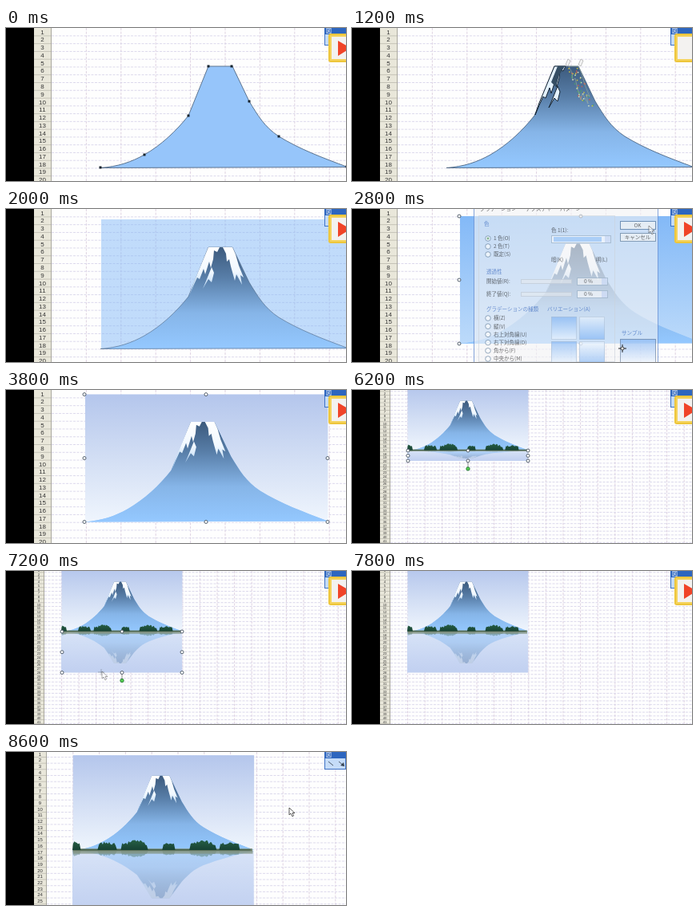
Recreate the animation shown at these times as an HTML page with a canvas. Size 425 by 192 pixels, loop 9.2 s.

```html
<!DOCTYPE html>
<html lang="ja">
<head>
<meta charset="utf-8">
<style>
html, body { margin: 0; width: 100%; height: 100%; overflow: hidden; background: #fff; }
canvas { display: block; width: 425px; height: 192px; }
</style>
</head>
<body>
<canvas id="stage" width="425" height="192"></canvas>
<script>
const c = document.getElementById('stage').getContext('2d');
const LOOP = 9200, STEP = 200;
const JP = '"Noto Sans CJK JP", "Noto Sans CJK", sans-serif';
const SANS = '"Liberation Sans", sans-serif';
const ramp = (t, a, b) => Math.max(0, Math.min(1, (t - a) / (b - a)));

function rng(seed) {
  return () => (seed = (seed * 16807) % 2147483647) / 2147483647;
}
function box(x, y, w, h, fill, stroke) {
  if (fill) { c.fillStyle = fill; c.fillRect(x, y, w, h); }
  if (stroke) { c.strokeStyle = stroke; c.lineWidth = 1; c.strokeRect(x + .5, y + .5, w - 1, h - 1); }
}
function line(x1, y1, x2, y2, color, width = 1) {
  c.strokeStyle = color; c.lineWidth = width;
  c.beginPath(); c.moveTo(x1, y1); c.lineTo(x2, y2); c.stroke();
}
function poly(p, fill, stroke, width = 1) {
  c.beginPath();
  for (let i = 0; i < p.length; i += 2) c.lineTo(p[i], p[i + 1]);
  c.closePath();
  if (fill) { c.fillStyle = fill; c.fill(); }
  if (stroke) { c.strokeStyle = stroke; c.lineWidth = width; c.stroke(); }
}
function text(s, x, y, size = 6.5, color = '#111', align = 'left', face = JP) {
  c.font = size + 'px ' + face; c.fillStyle = color;
  c.textAlign = align; c.textBaseline = 'middle';
  c.fillText(s, x, y);
}
function dot(x, y, r, fill, stroke) {
  c.beginPath(); c.arc(x, y, r, 0, 7);
  c.fillStyle = fill; c.fill();
  if (stroke) { c.strokeStyle = stroke; c.lineWidth = .9; c.stroke(); }
}
function fade(alpha, draw) {
  if (alpha <= 0) return;
  c.save(); c.globalAlpha *= alpha; draw(); c.restore();
}
function gradient(y1, y2, ...stops) {
  const g = c.createLinearGradient(0, y1, 0, y2);
  for (let i = 0; i < stops.length; i += 2) g.addColorStop(stops[i], stops[i + 1]);
  return g;
}
function cursor(x, y) {
  poly([x, y, x, y + 9, x + 2, y + 7, x + 4, y + 11, x + 5.5, y + 10, x + 4, y + 6.5, x + 7, y + 6.5], '#fff', '#333', .8);
}

// Worksheet per zoom level: header edge, row, column, font size, first row
const SHEETS = { 1: [57, 9.77, 43.4, 8, 5], .75: [51, 7.68, 32.8, 6, 2.6], .5: [48, 4.74, 21.6, 4.2, -.6] };
function sheet(zoom) {
  const [edge, row, col, size, first] = SHEETS[zoom];
  box(0, 0, 425, 192, '#fefefe');
  c.setLineDash([3, 1.5]);
  for (let x = edge + col; x < 425; x += col) line(x, 0, x, 192, '#dccfdf', .9);
  for (let n = 1; n < 43; n++) {
    const y = first + (n - .5) * row;
    line(edge, y, 425, y, '#d9d5ea', .9);
  }
  c.setLineDash([]);
  box(35, 0, edge - 35, 192, '#e9e7da');
  for (let n = 1; n < 43; n++) {
    const y = first + (n - 1) * row;
    line(35, y + row / 2, edge, y + row / 2, '#b5b3a8', .7);
    text(n, (34 + edge) / 2, y + .4, size, '#333', 'center', SANS);
  }
  line(edge - .5, 0, edge - .5, 192, '#aaa89e');
  box(0, 0, 35, 192, '#000');
}

function hill() {
  c.beginPath();
  c.moveTo(118, 175.5);
  c.bezierCurveTo(140, 174, 157, 168, 173, 159);
  c.bezierCurveTo(194, 147, 213, 129, 228, 110);
  c.lineTo(253, 48); c.lineTo(283, 48); c.lineTo(304, 92);
  c.bezierCurveTo(315, 110, 323, 124, 341, 136);
  c.bezierCurveTo(367, 152, 396, 163, 427, 174.5);
  c.closePath();
}
const NODES = [118, 175, 173, 159, 228, 110, 253, 48, 282, 48, 304, 92, 341, 136, 426, 174];
const SNOW_L = [253, 48, 267, 48, 264, 54, 260, 52, 259, 63, 256, 74, 254, 66, 249, 82, 247, 75, 242, 88, 239, 86, 234, 97, 229, 109, 234, 94];
const SNOW_R = [271, 48, 283, 48, 287, 57, 291, 71, 297, 86, 293, 83, 295, 95, 288, 82, 286, 90, 281, 72, 279, 63, 276, 66, 275, 56];
const SNOW_M = [246, 100, 251, 88, 257, 73, 260, 80, 257, 92, 253, 88];
const SNOWS = [SNOW_L, SNOW_R, SNOW_M];

function mountain(shade, outline) {
  hill(); c.fillStyle = '#96c5fa'; c.fill();
  fade(shade, () => {
    hill();
    c.fillStyle = gradient(48, 175, 0, '#3c5a7d', .3, '#587ea8', .65, '#86b5e8', 1, '#94c8ff');
    c.fill();
  });
  fade(outline, () => { hill(); c.strokeStyle = '#526984'; c.lineWidth = .9; c.stroke(); });
}

// Snow contour traced point by point
function trace(p, amount) {
  const n = Math.ceil(p.length / 2 * amount) * 2;
  if (n < 4) return;
  if (amount >= 1) return poly(p, '#e4f2ff', '#152432', 1);
  c.beginPath();
  for (let i = 0; i < n; i += 2) c.lineTo(p[i], p[i + 1]);
  c.strokeStyle = '#152432'; c.lineWidth = 1; c.stroke();
}
function editMarks() {
  const r = rng(37), hues = ['#d4c63d', '#4f9f67', '#c65d50', '#d8e4c0'];
  for (let i = 0; i < 46; i++) {
    const v = r(), x = 267 + r() * 16 + v * 19, y = 50 + v * 48;
    box(x, y, 1.5, 1.5, hues[i % 4]);
  }
  poly(SNOW_R, null, '#a9b99a', .5);
  for (const x of [267, 283]) poly([x, 46, x + 3, 39, x + 6, 41, x + 3, 48], '#f4f4f4', '#999', .6);
}

const TREES = (() => {
  const r = rng(91), p = [118, 175];
  for (let x = 119; x < 421; x += 2.2) {
    const bush = Math.sin(x * .115 + .6) + .8 * Math.sin(x * .047 + 4);
    p.push(x, bush > -.35 ? 167 - bush * 3 - r() * 5 : 174);
  }
  p.push(422, 175);
  return p;
})();

function trees(amount, shore) {
  c.save();
  c.beginPath(); c.rect(116, 140, 312 * amount, 38); c.clip();
  box(119, shore ? 172.5 : 169, 305, shore ? 4 : 7.5, shore || '#17392f');
  poly(TREES, gradient(156, 176, 0, '#286246', 1, '#163f33'));
  c.restore();
}

function scene(s) {
  fade(s.plain, () => box(119, 13, 308, 162.5, gradient(13, 175, 0, '#83b9f7', 1, s.tint)));
  fade(s.sky, () => box(119, 13, 308, 162.5, gradient(13, 175, 0, '#b4c6ec', .5, '#d2def4', 1, '#eff5fd')));
  mountain(s.shade, s.outline);
  if (s.trace > 0) {
    trace(SNOW_L, s.trace); trace(SNOW_M, s.trace);
    if (s.trace >= 1) poly([257, 48, 266, 48, 259, 59, 255, 74, 249, 68], '#344d63');
  }
  if (s.marks) editMarks();
  fade(s.snow, () => {
    const white = gradient(48, 110, 0, '#fff', .5, '#f1f8ff', 1, '#9fc9f0');
    SNOWS.forEach(p => poly(p, white));
  });
  if (s.trees > 0) trees(s.trees, s.shore);
}
function place(x, y, sx, sy, s) {
  c.save();
  c.translate(x, y); c.scale(sx, sy); c.translate(-118, -175.5);
  scene(s);
  c.restore();
}

function handles(x1, y1, x2, y2, knob) {
  const mx = (x1 + x2) / 2, my = (y1 + y2) / 2;
  if (knob) {
    line(mx, knob < my ? y1 : y2, mx, knob, '#777', .8);
    dot(mx, knob, 2.2, '#55cf50', '#267536');
  }
  for (const x of [x1, mx, x2]) for (const y of [y1, my, y2])
    if (x !== mx || y !== my) dot(x, y, 2, '#fff', '#43515e');
}

function dialog() {
  const title = (s, x, y) => text(s, x, y, 6.5, '#1d52b4');
  const radio = (s, y, on) => {
    dot(170, y, 3.3, '#fff', '#46698c');
    if (on) dot(170, y, 1.4, '#3c8a48');
    text(s, 177, y);
  };
  const field = (s, x, y, w) => {
    box(x, y - 5, w, 10, '#fff', '#7f9db9');
    text(s, x + 9, y);
    box(x + w - 8, y - 4, 7, 8, '#bed0f4');
  };
  box(152, -2, 231, 196, '#f3f4f6', '#3c70c8');
  box(158, 8, 171, 184, null, '#cbd2db');
  text('グラデーション', 160, 0); text('テクスチャ', 217, 0); text('パターン', 260, 0);
  title('色', 165, 19);
  radio('1 色(O)', 37, true); radio('2 色(T)', 47); radio('既定(S)', 57);
  text('色 1(1):', 249, 27);
  field('', 249, 38, 75); box(252, 35, 60, 6, '#83b7f5');
  text('暗(K)', 249, 64); text('明(L)', 305, 64);
  title('透過性', 168, 79);
  text('開始値(R):', 168, 91); text('終了値(Q):', 168, 107);
  for (const y of [91, 107]) {
    box(211, y - 3, 64, 6, '#e4e9ef', '#b8c4d2');
    field('0 %', 281, y, 39);
  }
  title('グラデーションの種類', 168, 126); title('バリエーション(A)', 244, 126);
  ['横(Z)', '縦(V)', '右上対角線(U)', '右下対角線(D)', '角から(F)', '中央から(M)']
    .forEach((s, i) => radio(s, 137 + i * 10.2));
  for (let i = 0; i < 4; i++) {
    const x = 249 + i % 2 * 35, y = 135 + (i >> 1) * 31;
    const ends = i % 2 ? ['#eff7ff', '#76aef4'] : ['#76aef4', '#eff7ff'];
    box(x, y, 32, 29, gradient(y, y + 29, 0, ends[0], 1, ends[1]), '#aec0d6');
  }
  box(335, 15, 45, 11, '#f8f8f5', '#23568e'); text('OK', 357, 20.5, 6.5, '#111', 'center');
  box(335, 30, 45, 11, '#f8f8f5', '#42688e'); text('キャンセル', 357, 35.5, 6.5, '#111', 'center');
  title('サンプル', 337, 156);
  box(335, 163, 45, 30, gradient(163, 192, 0, '#75acf2', 1, '#eaf3ff'), '#667b95');
  cursor(371, 21);
}

function menu(sub) {
  box(254, -2, 128, 114, '#f8f9fb', '#3f68ac');
  box(255, 0, 15, 111, '#bcd2f3');
  box(255, 33, 126, 13, '#ffe6a5', '#8d8467');
  ['コピー(C)', '貼り付け(P)', '再変換(V)', 'グループ化(G)', '順序(R)', 'マクロの登録(N)...',
    'オートシェイプの既定値に設定(D)', 'オブジェクトの書式設定(O)...', 'ハイパーリンク(H)...']
    .forEach((s, i) => text(s, 273, i * 13.1, 6.4, i === 2 || i === 8 ? '#a5acb5' : '#111'));
  for (const y of [20, 59, 98]) line(272, y, 381, y, '#c7cfdb', .8);
  for (const y of [39, 52]) poly([374, y - 3, 377, y, 374, y + 3], '#222');
  box(259, 9, 6, 7, '#fff', '#5a719e');
  box(259, 88, 6, 6, '#f2d78d', '#5a719e');
  fade(sub, () => {
    box(381, 33, 50, 42, '#f2f4f8', '#7890b2');
    box(382, 34, 14, 40, '#bcd2f3');
    ['グループ化(G)', 'グループ解除(U)', '再グループ化(E)'].forEach((s, i) => {
      text(s, 399, 40 + i * 13, 6.4, '#59606a');
      box(385, 37 + i * 13, 7, 6, null, '#6a7c99');
    });
  });
}

function toolbar(play, done) {
  box(398, 0, 27, 22, '#c5dcf8', '#3f73c6');
  box(398, 0, 27, 8, '#2d66bf');
  text('図', 400, 3.5, 7, '#fff');
  if (done) {
    line(403, 12, 409, 17, '#4d5968');
    line(416, 12, 422, 17, '#4d5968');
    poly([423, 18, 418, 17, 422, 13], '#34404e');
    return;
  }
  c.beginPath(); c.roundRect(403, 7, 40, 36, 3);
  c.fillStyle = '#edc63c'; c.fill();
  box(405, 9, 28, 32, '#f5d35c');
  box(407, 11, 26, 28, '#f3f2f0');
  if (play) poly([415, 16, 431, 25, 415, 35], '#f04428');
}

// Small pictures with the squashed mirror image below
function lake(zoom, t, s) {
  const x = zoom === .5 ? 69 : 83, y = zoom === .5 ? 76 : 123.5;
  const flip = ramp(t, 6000, 6800), k = zoom * .98;
  const w = 302 * zoom, h = 103 * zoom * flip;
  if (flip > 0) {
    box(x, y, w, h, '#c9d6f2');
    fade(.5, () => place(x, y, k, -.64 * k * flip, s));
    box(x, y, w, h, gradient(y, y + h, 0, 'rgba(206,222,247,.3)', 1, 'rgba(196,210,242,.45)'));
    box(x + 1, y, w - 2, 5.5 * zoom * flip, 'rgba(128,146,126,.75)');
  }
  place(x, y, k, k, s);
  if (!flip) handles(x, -4, x + w, y);
  else if (t < 7800) handles(x + 1, y, x + w, y + h, y + h + 10);
}

function render(t) {
  const zoom = t < 5800 ? 1 : t < 8000 ? .5 : .75;
  const s = {
    shade: ramp(t, 0, 600),
    outline: 1 - ramp(t, 1800, 2400),
    trace: t < 2000 ? ramp(t, 400, 1200) : 0,
    marks: t >= 800 && t < 1600,
    snow: ramp(t, 1200, 2000),
    plain: ramp(t, 1800, 2200) * (t < 3200),
    tint: t < 2600 ? '#83b9f7' : '#bcdafa',
    sky: ramp(t, 2800, 3200),
    trees: ramp(t, 3800, 5000),
    shore: t < 6200 ? '' : '#78866d'
  };
  sheet(zoom);

  if (zoom < 1) lake(zoom, t, s);
  else if (t < 2200) {
    place(118, 175.5, 1, 1, s);
    if (t < 400) for (let i = 0; i < NODES.length; i += 2) box(NODES[i] - 1.5, NODES[i + 1] - 1.5, 3, 3, '#17232d');
  } else {
    const x = t < 3200 ? 134 : 98, y = t < 3200 ? 169 : 165.5;
    place(x, y, .985, .985, s);
    handles(x, y - 160, x + 304, y, t >= 4800 ? 134 : 0);
  }

  if (t >= 2400 && t < 3200) {
    fade(t === 2600 ? .9 : t === 2800 ? .6 : .3, dialog);
    if (t >= 2800) {
      line(333, 175, 343, 175, '#222'); line(338, 170, 338, 180, '#222');
      dot(338, 175, 2, '#fff', '#333');
    }
  }
  toolbar(t < 1000 || t >= 1600, t >= 8400);
  if (t >= 5000 && t < 5600) menu(ramp(t, 5000, 5400) * .9);
  if (t >= 7000 && t < 7600) fade(.5, () => {
    line(115, 127, 123, 127, '#59636d', .8);
    line(119, 123, 119, 131, '#59636d', .8);
    cursor(120, 126);
  });
  if (t >= 8000) cursor(354 - 60 * (1 - ramp(t, 8000, 8400)), 70);
}

function tick(now) {
  render(Math.min(8600, Math.floor(now % LOOP / STEP) * STEP));
  requestAnimationFrame(tick);
}
requestAnimationFrame(tick);
</script>
</body>
</html>
```
